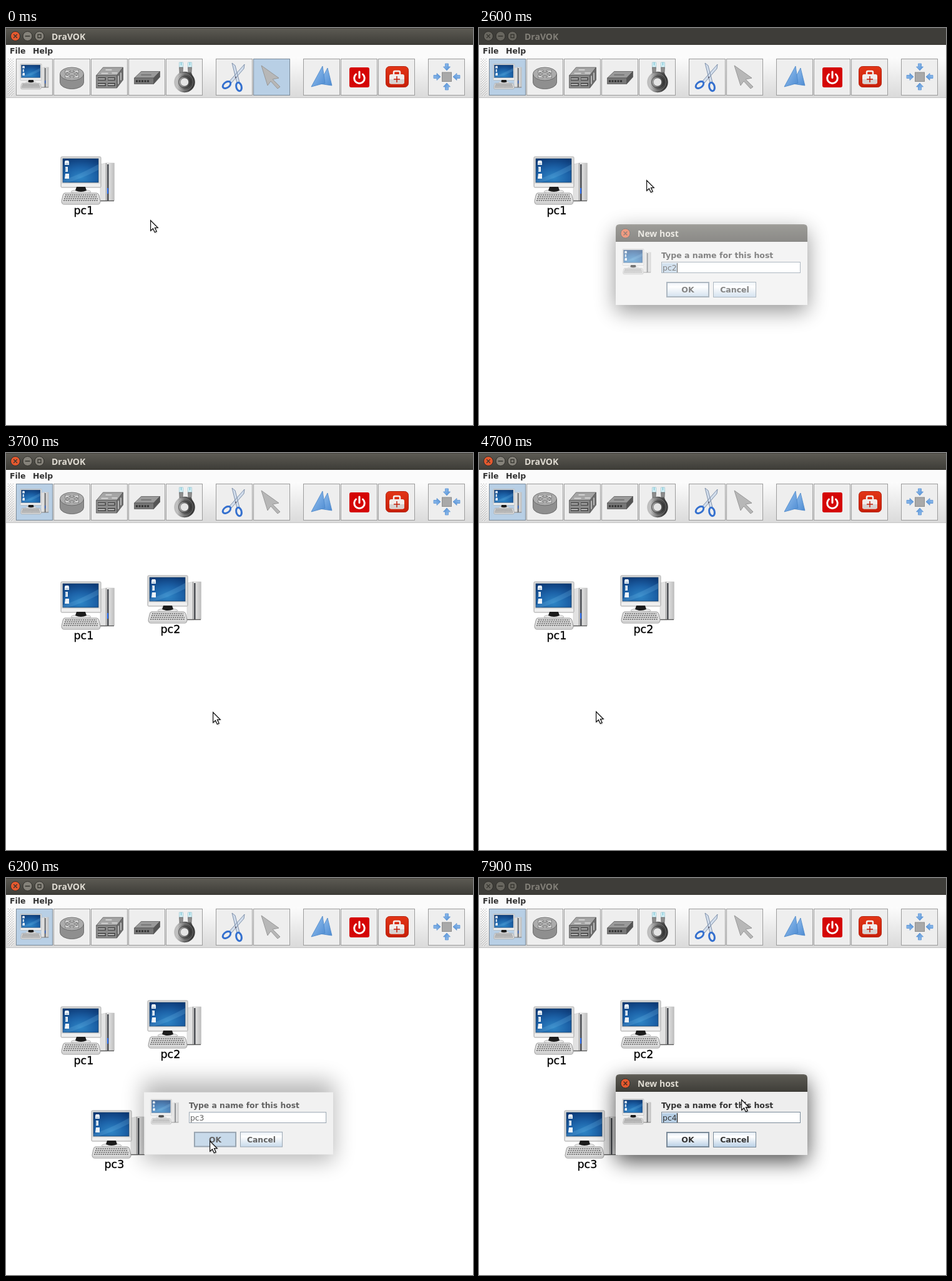
Recreate the animation shown at these times as an HTML page. Size 748 px wide and 635 px high, loop 8 s.

```html
<!DOCTYPE html>
<html lang="en">
<head>
<meta charset="utf-8">
<title>Network editor</title>
<style>
html, body { margin: 0; width: 100%; height: 100%; overflow: hidden; background: #fff; }
svg { display: block; width: 748px; height: 635px; }
text { font: 12.5px "DejaVu Sans", sans-serif; fill: #333; white-space: pre; }
.b { font-weight: bold; }
.title { font: bold 14px "Open Sans", "Noto Sans", sans-serif; fill: #dfdbd2; }
.label { font-size: 17.5px; fill: #000; stroke: #000; stroke-width: .35px; text-anchor: middle; }
.btn { fill: #eee; stroke: #9c9c9c; }
.btn.on { fill: #b8cfe5; stroke: #7a8a99; }
.line { fill: none; stroke-linecap: round; }
</style>
</head>
<body>
<svg viewBox="0 0 748 635">
<defs>
  <linearGradient id="bar" x2="0" y2="1"><stop stop-color="#5d5b54"/><stop offset="1" stop-color="#3d3c37"/></linearGradient>
  <linearGradient id="tools" x2="0" y2="1"><stop stop-color="#fcfcfc"/><stop offset="1" stop-color="#dadada"/></linearGradient>
  <linearGradient id="push" x2="0" y2="1"><stop stop-color="#e3ecf5"/><stop offset=".3" stop-color="#fff"/><stop offset="1" stop-color="#b8cfe5"/></linearGradient>
  <radialGradient id="screen" cx=".5" cy=".8" r=".85"><stop stop-color="#2f86c6"/><stop offset=".5" stop-color="#1c62a8"/><stop offset="1" stop-color="#0d3b78"/></radialGradient>
  <linearGradient id="metal" x2="1"><stop stop-color="#f4f4f4"/><stop offset="1" stop-color="#bdbdbd"/></linearGradient>
  <linearGradient id="coil" x2="1"><stop stop-color="#bdbdbd"/><stop offset=".5" stop-color="#666"/><stop offset="1" stop-color="#3a3a3a"/></linearGradient>
  <linearGradient id="blue" x2="1" y2="1"><stop stop-color="#9cc6f2"/><stop offset="1" stop-color="#4d8bd2"/></linearGradient>
  <linearGradient id="red" x2="0" y2="1"><stop stop-color="#e23517"/><stop offset="1" stop-color="#c81f08"/></linearGradient>
  <pattern id="grip" width="4" height="4" x="3" y="49" patternUnits="userSpaceOnUse">
    <path d="M0 0h1v1h-1zM2 2h1v1h-1z" fill="#a5a5a5"/><path d="M1 1h1v1h-1zM3 3h1v1h-1z" fill="#fff"/>
  </pattern>
  <filter id="soft" x="-40%" y="-80%" width="180%" height="260%"><feGaussianBlur stdDeviation="17"/></filter>
  <filter id="near" x="-50%" y="-50%" width="200%" height="200%"><feGaussianBlur stdDeviation="1"/></filter>
  <!-- The shadow never shows through the window itself -->
  <clipPath id="outside-window"><path clip-rule="evenodd" d="M0 0h748v635H0zM219 320q0-6 6-6h295q6 0 6 6v123H219z"/></clipPath>
  <clipPath id="outside-body"><path clip-rule="evenodd" d="M0 0h748v635H0zM221 343h303v99H221z"/></clipPath>

  <g id="pc">
    <path d="M64 13l9-2v61h-9z" fill="#e2e2e2" stroke="#cacaca" stroke-width=".6"/>
    <path d="M73 11h13.500v60l-13.500 1z" fill="url(#metal)" stroke="#c2c2c2" stroke-width=".6"/>
    <path d="M73 11h1.200v61h-1.200z" fill="#9a9a9a"/>
    <path d="M75 13h2.600v58h-2.600z" fill="#4a4d52"/>
    <path d="M64 71.500h22" stroke="#555" stroke-width="1.300"/>
    <rect x="1" y="1" width="64" height="49" rx="1.500" fill="#dedede" stroke="#a9a9a9"/>
    <path d="M2 44h62v5h-62z" fill="#efefef"/>
    <rect x="4" y="4" width="57" height="38" fill="url(#screen)" stroke="#16395f" stroke-width=".7"/>
    <path d="M4 38Q26 32 61 13V22Q34 36 12 42H4z" fill="#6db4e4" opacity=".25"/>
    <path d="M8 7h5l1 2v5h-7v-5zM8 17h4v8h-4zM8 28h6v8h-7z" fill="#eef3f8"/>
    <path d="M8 12h5M9 18v6" stroke="#7fa6c9"/>
    <ellipse cx="33" cy="57" rx="16" ry="3.500" fill="#e6e6e6" stroke="#aaa" stroke-width=".7"/>
    <path d="M26 49h14l2 6q-9 4-18 0z" fill="#1c1c1c"/>
    <path d="M7 59h51q3 0 4 4l2 9q0 5-4 5H6q-4 0-4-5l2-9q1-4 3-4z" fill="#dedede" stroke="#8f8f8f" stroke-width=".9"/>
    <path d="M8 62h50M7 65h52M6 68h54M5 71h56" stroke="#7d7d7d" stroke-width="2" stroke-dasharray="2.200 1.300"/>
    <path d="M3 74.500h60" stroke="#c4c4c4"/>
  </g>
  <path id="led" d="M76 51v9" stroke="#1d5fe0" stroke-width="2"/>
  <path id="in" d="M-2.500-5.500h5v5h3l-5.500 6l-5.500-6h3z" fill="url(#blue)" stroke="#5c93d3" stroke-width=".8"/>
</defs>

<rect width="748" height="635" fill="#fff"/>
<rect id="bar-bg" width="748" height="27" fill="url(#bar)"/>
<path d="M0 .5h748" stroke="#45443f"/>
<path d="M0 26.500h748" stroke="#33322e"/>
<circle id="close" cx="15" cy="13" r="7.500" stroke="#2f2e2a"/>
<g id="others" stroke="#2f2e2a"><circle cx="34.500" cy="13" r="7.500"/><circle cx="53.500" cy="13" r="7.500"/></g>
<path class="line" d="M12.500 10.500l5 5m0-5l-5 5M31 13h7M51 10.500h5v5h-5z" stroke="#35342f" stroke-width="1.300"/>
<text id="app" class="title" x="73" y="19">DraVOK</text>

<rect y="27" width="748" height="19" fill="#fbfbfb"/>
<rect y="46" width="748" height="65" fill="url(#tools)"/>
<path d="M0 111.500h748" stroke="#c6c6c6"/>
<text class="b" x="6" y="41">File</text>
<text class="b" x="43" y="41">Help</text>
<rect x="3" y="49" width="10" height="60" fill="url(#grip)"/>
<g id="buttons"></g>
<rect id="focus" x="18.500" y="51.500" width="54" height="54" fill="none" stroke="#8ba9ca"/>

<g id="icons">
  <g transform="translate(22.500 57) scale(.53)"><use href="#pc"/><use href="#led"/></g>

  <g stroke="#5e5e5e" stroke-width=".8">
    <path d="M86.500 74v13a19 10.500 0 0 0 38 0V74z" fill="#8f8f8f"/>
    <ellipse cx="105.500" cy="73.500" rx="19" ry="10.500" fill="#acacac"/>
  </g>
  <path class="line" d="M96 68.500l19 10M115 68.500l-19 10M96 72v-3.500h6M115 75v3.500h-6M109 68.500h6v3M102 78.500h-6v-3" stroke="#666" stroke-width="3"/>
  <path class="line" d="M96 68.500l19 10M115 68.500l-19 10M96 72v-3.500h6M115 75v3.500h-6M109 68.500h6v3M102 78.500h-6v-3" stroke="#e4e4e4" stroke-width="1.400"/>

  <g stroke="#505050" stroke-width=".7">
    <path d="M144.500 76l11-13h32l-10 13z" fill="#a5a5a5"/>
    <path d="M177.500 76l10-13v20l-10 13z" fill="#6c6c6c"/>
    <path d="M144.500 76h33v20h-33z" fill="#8a8a8a"/>
  </g>
  <path d="M147 79h13v5h-13zM163 79h12v5h-12zM147 88h13v5h-13zM163 88h12v5h-12z" fill="#484848"/>
  <path class="line" d="M148 81.500h10M164 81.500h9M148 90.500h10M164 90.500h9M153 72.500h10M160 67h9M170 72h8M180 77v12M184 72v11" stroke="#dedede" stroke-width="1.300"/>

  <g stroke="#505050" stroke-width=".7">
    <path d="M205.500 80l11-10.500h30l-10 10.500z" fill="#9a9a9a"/>
    <path d="M236.500 80l10-10.500v9l-10 11z" fill="#555"/>
    <path d="M205.500 80h31v9.500h-31z" fill="#777"/>
  </g>
  <path d="M208 85h21" stroke="#303030" stroke-width="3" stroke-dasharray="3 1.500"/>
  <path class="line" d="M217 75h15" stroke="#777" stroke-width="2"/>

  <path class="line" d="M280.500 70q-1 3-3 6M294.500 70q1 3 2 6" stroke="#555" stroke-width="4"/>
  <ellipse cx="286" cy="86.500" rx="11.500" ry="11.500" fill="#e4e4e4" stroke="url(#coil)" stroke-width="10.500"/>
  <ellipse cx="286" cy="86.500" rx="13.500" ry="13.500" fill="none" stroke="#ddd" stroke-width=".6" opacity=".5"/>
  <ellipse cx="286" cy="86.500" rx="9.500" ry="9.500" fill="none" stroke="#222" stroke-width=".7"/>
  <path d="M277.500 55h6v8h-6zM291.500 55h6v8h-6z" fill="#d9f2f7" stroke="#a9cfd8"/>
  <path d="M277.500 63h6l-.5 8h-5zM291.500 63h6l-.5 8h-5z" fill="#8d8d8d" stroke="#666" stroke-width=".7"/>
  <path d="M280.500 55v5M294.500 55v5" stroke="#62b7cc"/>

  <path d="M382 58l-1 7-20 23-3-3zM362 56l5 4 7 27-4 1z" fill="#d3deec" stroke="#7487a3" stroke-width=".9"/>
  <g fill="none" stroke="#3470cf" stroke-width="3">
    <ellipse cx="353.500" cy="91" rx="7" ry="4.400" transform="rotate(-35 353.500 91)"/>
    <ellipse cx="373" cy="94" rx="4.200" ry="6.800" transform="rotate(-14 373 94)"/>
  </g>
  <circle cx="368" cy="79" r="1.300" fill="#667"/>

  <path d="M409 60l28 20-10 2 12 12-4 3-11-12-5 7z" fill="#b7b7b7" stroke="#989898"/>

  <path d="M515 64l7 28-20-3z" fill="url(#blue)" stroke="#4a86c8" stroke-width=".8"/>
  <path d="M507 61l4 27-22 6z" fill="url(#blue)" stroke="#4a86c8" stroke-width=".8"/>

  <rect x="550" y="63" width="32" height="32" rx="3" fill="#d50505"/>
  <path class="line" d="M560.500 74a8.300 8.300 0 1 0 11 0M566 70v9.500" stroke="#fff" stroke-width="3"/>

  <rect x="608.500" y="61.500" width="36" height="33" rx="6" fill="url(#red)" stroke="#b52311"/>
  <path d="M621 75v-4q0-2 2-2h6q2 0 2 2v4" fill="none" stroke="#f4efed" stroke-width="2.500"/>
  <rect x="614" y="74" width="24" height="15.500" rx="3" fill="#f1edeb"/>
  <path d="M614 82h24v4.500q0 3-3 3h-18q-3 0-3-3z" fill="#d8d2d0"/>
  <path d="M626 77v10M621 82h10" stroke="#c1200d" stroke-width="1.500"/>

  <rect x="698.500" y="71" width="15" height="14.500" fill="#a9a9a9" stroke="#8d8d8d"/>
  <g id="inward"></g>
</g>

<g id="hosts"></g>

<rect id="shadow" x="219" y="324" width="307" height="129" rx="6" filter="url(#soft)"/>
<g id="dialog">
  <g id="frame">
    <path d="M219 343v-23q0-6 6-6h295q6 0 6 6v23z" fill="url(#bar)"/>
    <path d="M222 315.500h301" stroke="#6b6961" opacity=".6"/>
    <circle cx="234.500" cy="328.500" r="7.500" fill="#e5592f" stroke="#2f2e2a"/>
    <path class="line" d="M232 326l5 5m0-5l-5 5" stroke="#4a2a1c" stroke-width="1.300"/>
    <text class="title" x="254" y="334">New host</text>
  </g>
  <rect x="219" y="342" width="307" height="101" fill="#eee"/>
  <use href="#pc" transform="translate(229.500 353) scale(.53)"/>
  <text class="b" x="292" y="368">Type a name for this host</text>
  <rect x="292.500" y="374.500" width="222" height="17" fill="#fff" stroke="#7a8a99"/>
  <g id="picked"><rect x="293" y="376" width="24" height="15" fill="#b8cfe5"/><path d="M317.500 376v15" stroke="#000"/></g>
  <text id="name" x="294" y="388"></text>
  <rect id="ok" x="301" y="407" width="67" height="23" stroke="#7a8a99" stroke-width="2"/>
  <rect x="375.500" y="406.500" width="68" height="24" fill="url(#push)" stroke="#7a8a99"/>
  <text class="b" x="334.500" y="423" text-anchor="middle">OK</text>
  <text class="b" x="409.500" y="423" text-anchor="middle">Cancel</text>
</g>

<g id="pointer">
  <path d="M1 2v17l4-3.500 3 6 3-1.500-3-6h5.500z" opacity=".3" filter="url(#near)"/>
  <path d="M.6.8v16.400l3.900-3.500 2.800 6 2.900-1.300-2.800-5.900h4.800z" fill="#fff" stroke="#111" stroke-width="1.200"/>
</g>
</svg>

<script>
const $ = id => document.getElementById(id);
const LOOP = 8000, STEP = 100;

const buttonX = [16, 76, 136, 196, 256, 336, 396, 476, 536, 596, 676];
$('buttons').innerHTML = buttonX.map(x =>
  `<rect class="btn" x="${x + .5}" y="49.5" width="58" height="58"/>`).join('');
const hostButton = $('buttons').children[0], selectButton = $('buttons').children[6];

$('inward').innerHTML = [0, 90, 180, 270].map(a =>
  `<use href="#in" transform="rotate(${a} 706 78) translate(706 62.5)"/>`).join('');

// Hosts: left, top and the time they appear
const hosts = [[87, 205, 0], [226, 195, 3500], [136, 371, 6100]];
$('hosts').innerHTML = hosts.map(([x, y], i) =>
  `<g transform="translate(${x} ${y})"><use href="#pc"/>${i ? '' : '<use href="#led"/>'}
   <text class="label" x="37.4" y="93">pc${i + 1}</text></g>`).join('');

const dialogs = [
  { name: 'pc2', show: 2600, full: 2800, press: 3400, close: 3500 },
  { name: 'pc3', show: 5200, full: 5200, press: 6000, close: 6100 },
  { name: 'pc4', show: 7600, full: 7700, press: 9000, close: 9100 },
];
const FADE = 200;

// Pointer: time, x, y
const path = [
  [0, 231, 307], [100, 235, 305], [300, 235, 305], [1100, 48, 78], [1200, 48, 78],
  [1500, 126, 156], [2100, 263, 243], [2300, 268, 243], [2900, 268, 243],
  [3100, 309, 361], [3300, 331, 414], [3800, 331, 414], [4200, 268, 387],
  [4500, 211, 416], [4700, 187, 413], [4900, 177, 419], [5200, 177, 419],
  [5900, 326, 420], [6500, 326, 420], [7300, 536, 229], [7600, 536, 229],
  [7900, 420, 354], [8000, 420, 354],
];

function pointerAt(t) {
  const i = path.findIndex(p => p[0] > t);
  const [t0, x0, y0] = path[i - 1], [t1, x1, y1] = path[i];
  let k = (t - t0) / (t1 - t0);
  if (t1 - t0 >= 700) k = k * k * (3 - 2 * k);
  return [Math.round(x0 + (x1 - x0) * k), Math.round(y0 + (y1 - y0) * k)];
}

const toggle = (el, on) => el.setAttribute('display', on ? 'inline' : 'none');

function drawDialog(t) {
  const d = dialogs.find(d => t >= d.show && t < d.close + FADE);
  toggle($('dialog'), d);
  toggle($('shadow'), d);
  if (!d) return false;
  const closing = t >= d.close;
  const gone = closing ? (t - d.close) / FADE : 0;
  const alpha = closing ? .92 - gone * .3 : 1 - Math.max(0, d.full - t) / 500;
  const size = 1 - gone * .026;
  $('dialog').setAttribute('opacity', alpha);
  $('dialog').setAttribute('transform',
    `translate(372.5 392.5) scale(${size}) translate(-372.5 -392.5)`);
  $('shadow').setAttribute('opacity', closing ? .4 - gone * .24 : .7 * alpha);
  $('shadow').setAttribute('clip-path', `url(#outside-${closing ? 'body' : 'window'})`);
  toggle($('frame'), !closing);
  toggle($('picked'), t < d.press);
  $('name').textContent = d.name;
  $('ok').setAttribute('fill', t < d.press ? 'url(#push)' : '#b8cfe5');
  return !closing;
}

function draw(t) {
  const modal = drawDialog(t);
  $('bar-bg').setAttribute('fill', modal ? '#3e3d39' : 'url(#bar)');
  $('close').setAttribute('fill', modal ? '#68665f' : '#e5592f');
  $('others').setAttribute('fill', modal ? '#68665f' : '#85827a');
  $('app').style.fill = modal ? '#827f78' : '#dfdbd2';
  hostButton.classList.toggle('on', t >= 1100);
  selectButton.classList.toggle('on', t < 1300);
  toggle($('focus'), t >= 1300 && t < 2300);
  hosts.forEach((h, i) => toggle($('hosts').children[i], t >= h[2]));
  $('pointer').setAttribute('transform', `translate(${pointerAt(t)})`);
}

const start = performance.now();
function tick() {
  const t = (performance.now() - start) % LOOP;
  draw(Math.floor(t / STEP) * STEP);
  requestAnimationFrame(tick);
}
tick();
</script>
</body>
</html>
```
